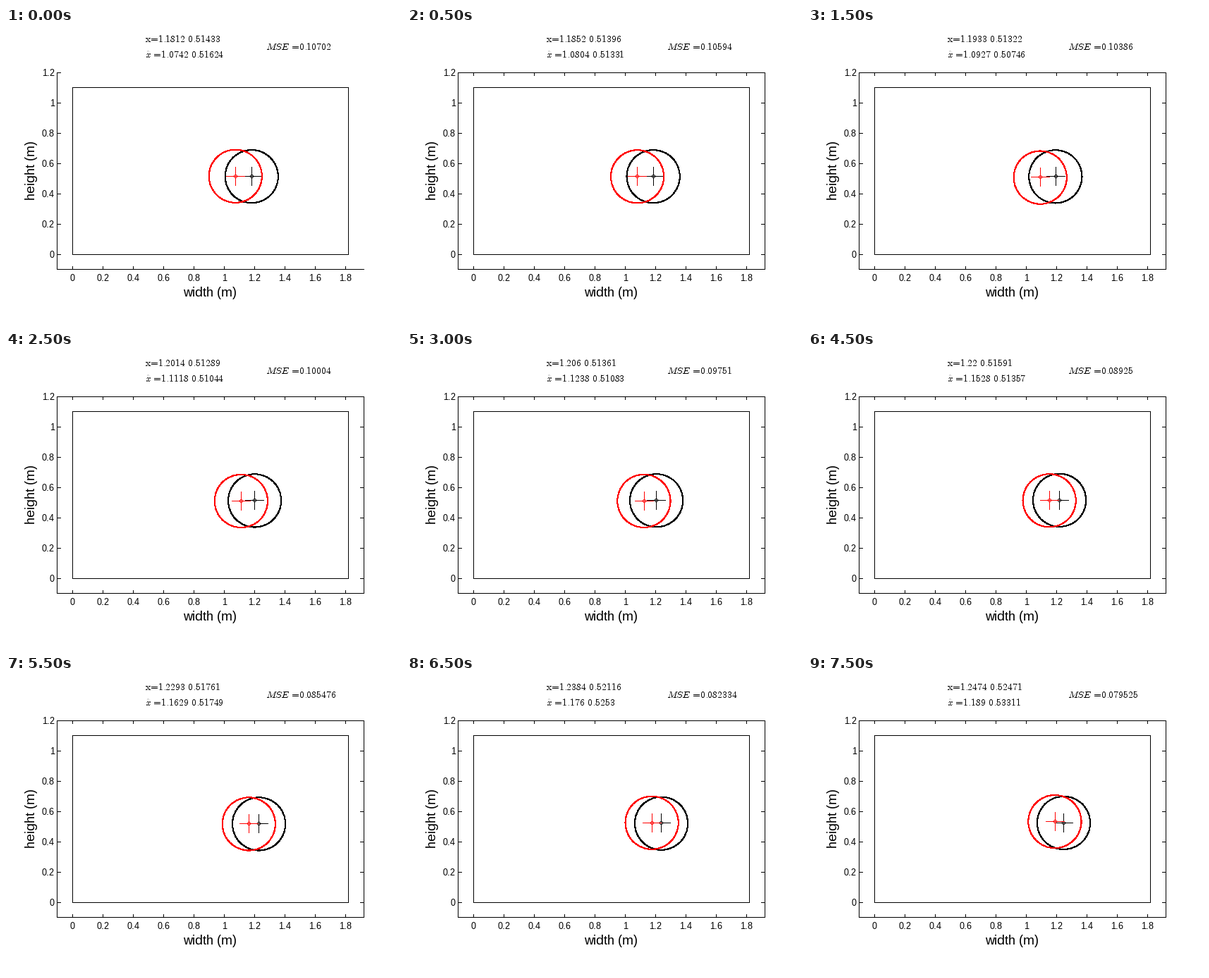
These frames come from a looping animation (560x420 px, 8 s). A matplotlib script:

```python
import math

import matplotlib.pyplot as plt
import numpy as np
from matplotlib.animation import FuncAnimation
from matplotlib.patches import Circle

W, H, DPI = 560, 420, 100
FRAMES, STEP_MS = 16, 500
X0, Y0, SCALE = 94, 321, 215        # pixel position of (0, 0), pixels per metre
LEFT, RIGHT, TOP, BOTTOM = 72, 507, 63, 342
PX = 72 / DPI                       # points per pixel

plt.rcParams.update({
    "font.family": "Liberation Sans",
    "mathtext.fontset": "cm",
    "text.hinting": "native",
    "text.hinting_factor": 1,
})

fig = plt.figure(figsize=(W / DPI, H / DPI), dpi=DPI, facecolor="white")
ax = fig.add_axes([0, 0, 1, 1])
ax.set_xlim(0, W)
ax.set_ylim(H, 0)
ax.axis("off")

KEYS = [0, 3, 5, 8, 11, 15]


def track(*values):
    """Value at every step, linear between the key steps."""
    return np.interp(np.arange(FRAMES), KEYS, values)


true_x = track(1.1812, 1.1933, 1.2014, 1.2153, 1.2293, 1.2474)
true_y = track(0.51433, 0.51322, 0.51289, 0.51506, 0.51761, 0.52471)
est_x = track(1.0742, 1.0927, 1.1118, 1.1477, 1.1629, 1.189)
est_y = track(0.51624, 0.50746, 0.51044, 0.51161, 0.51749, 0.53311)

# running mean of the distance between both centres
error = np.hypot(true_x - est_x, true_y - est_y)
mse = np.cumsum(error) / np.arange(1, FRAMES + 1)


def seg(x0, y0, x1, y1, color="black", z=1):
    """One pixel wide line covering both end pixels."""
    line, = ax.plot([], [], color=color, lw=PX, antialiased=False, snap=False,
                    solid_capstyle="butt", zorder=z)
    move(line, x0, y0, x1, y1)
    return line


def move(line, x0, y0, x1, y1):
    if y0 == y1:
        line.set_data([x0, x1 + 1], [y0 + 0.5, y0 + 0.5])
    else:
        line.set_data([x0 + 0.5, x0 + 0.5], [y0, y1 + 1])


def label(x, y, s, size, **kw):
    return ax.text(x, y, s, fontsize=size * PX, va="baseline", **kw)


# axes, ticks and labels
seg(LEFT, TOP, LEFT, BOTTOM)
seg(LEFT, BOTTOM, RIGHT, BOTTOM)
frame_box = [seg(LEFT, TOP, RIGHT, TOP), seg(RIGHT, TOP, RIGHT, BOTTOM)]
for k in range(10):
    x = X0 + 43 * k
    seg(x, BOTTOM - 4, x, BOTTOM)
    frame_box.append(seg(x, TOP, x, TOP + 4))
    label(x + 0.5, 359, f"{k / 5:g}", 13, ha="center")
for k in range(7):
    y = Y0 - 43 * k
    seg(LEFT, y, LEFT + 5, y)
    frame_box.append(seg(RIGHT - 5, y, RIGHT, y))
    label(69, y + 5, f"{k / 5:g}", 13, ha="right")
label(289, 381, "width (m)", 18.67, ha="center")
label(41, 202, "height (m)", 18.67, ha="center", rotation=90, rotation_mode="anchor")

# the field
for y in (84, Y0):
    seg(X0, y, 485, y)
for x in (X0, 485):
    seg(x, 84, x, Y0)


class Target:
    """Ring with a cross and a small hollow dot at its centre."""

    # offsets of the cross arms and the dot's four sides: x0, y0, x1, y1
    PARTS = [(-13, 0, 13, 0), (0, -13, 0, 13)]
    for d in (-2, 2):
        PARTS += [(-1, d, 1, d), (d, -1, d, 1)]

    def __init__(self, color, z):
        self.ring = Circle((0, 0), 37.6, fill=False, ec=color, lw=1.1 * PX,
                           antialiased=False, zorder=z)
        ax.add_patch(self.ring)
        self.lines = [seg(*p, color, z + 1) for p in self.PARTS]

    def place(self, x, y):
        px, py = X0 + SCALE * x, Y0 - SCALE * y
        cx, cy = round(px), math.floor(py)
        self.ring.center = (px + 0.3, py + 0.2)
        for line, (x0, y0, x1, y1) in zip(self.lines, self.PARTS):
            move(line, cx + x0, cy + y0, cx + x1, cy + y1)


truth, guess = Target("black", 3), Target("red", 6)

EQ = r"\hspace{-0.2}=\hspace{-0.2}"
true_text = label(197, 20, "", 13.9)
est_text = label(197, 42, "", 13.9)
mse_text = label(368.5, 31, "", 13.9)


def pair(a, b):
    return rf"{a:.5g}\ {b:.5g}"


def draw(i):
    for line in frame_box:
        line.set_visible(i > 0)
    truth.place(true_x[i], true_y[i])
    guess.place(est_x[i], est_y[i])
    true_text.set_text(rf"$\mathrm{{x}}{EQ}{pair(true_x[i], true_y[i])}$")
    est_text.set_text(rf"$\hat{{x}}\ {EQ}{pair(est_x[i], est_y[i])}$")
    mse_text.set_text(rf"$MSE\ {EQ}{mse[i]:.5g}$")
    return []


anim = FuncAnimation(fig, draw, frames=FRAMES, interval=STEP_MS, repeat=True,
                     repeat_delay=0, blit=False)
plt.show()
```
